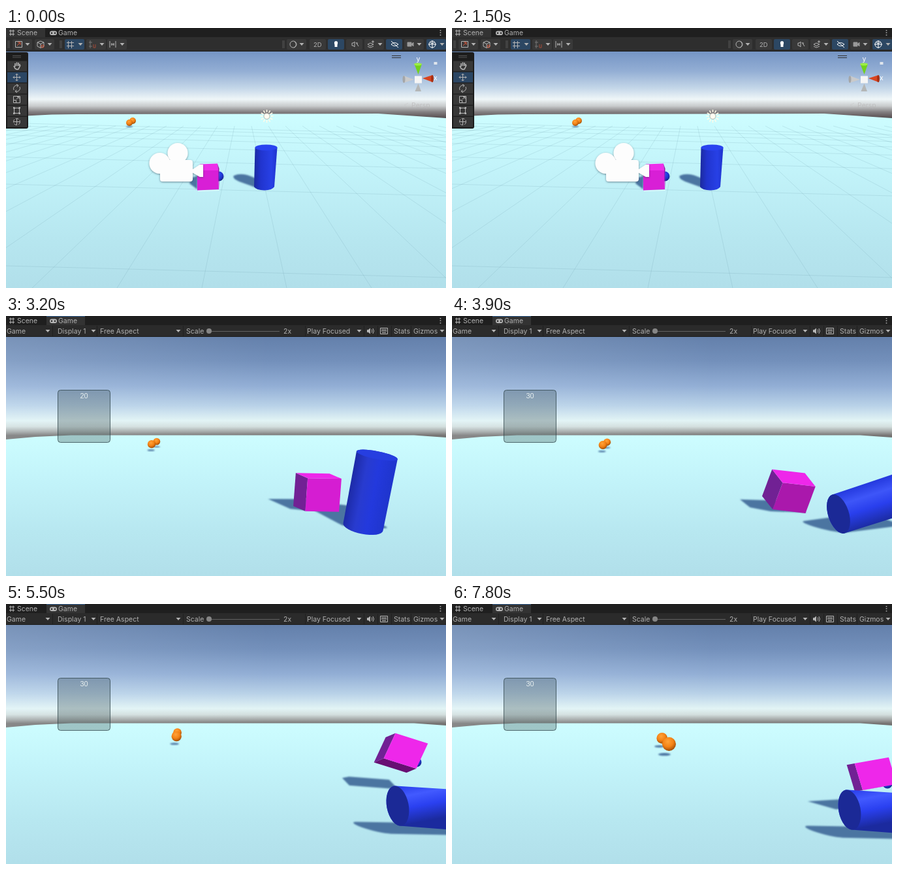
Animation, 674 px wide and 398 px high, one loop 7900 ms. Source, as an HTML page:

```html
<!DOCTYPE html>
<html lang="en">
<head>
<meta charset="utf-8">
<title>Scene and game view</title>
<style>
html, body { margin: 0; width: 100%; height: 100%; overflow: hidden; background: #1f1f1f; }
svg { display: block; width: 674px; height: 398px; }
text { font: 10.5px Inter, "Liberation Sans", sans-serif; fill: #b0b0b0; }
.line { fill: none; stroke: #b4b4b4; stroke-width: 1; }
.icon { fill: #b4b4b4; }
.shadow { fill: #4b75a1; filter: url(#soft); }
</style>
</head>
<body>
<svg viewBox="0 0 674 398">
  <defs>
    <filter id="soft" x="-20%" y="-20%" width="140%" height="140%"><feGaussianBlur stdDeviation=".8"/></filter>
    <filter id="halo" x="-20%" y="-20%" width="140%" height="140%"><feDropShadow dx="0" dy="1" stdDeviation="1.5" flood-color="#345" flood-opacity=".6"/></filter>
    <linearGradient id="sky" gradientUnits="userSpaceOnUse" x1="0" x2="0" y1="31" y2="183">
      <stop stop-color="#637faa"/><stop offset=".25" stop-color="#7390bb"/><stop offset=".5" stop-color="#92aed5"/>
      <stop offset=".7" stop-color="#b9d2e8"/><stop offset=".85" stop-color="#e2f4f5"/><stop offset=".91" stop-color="#d3dfde"/>
      <stop offset=".96" stop-color="#a4a8a7"/><stop offset="1" stop-color="#757372"/>
    </linearGradient>
    <linearGradient id="glow"><stop stop-color="#e8f6ff" stop-opacity=".16"/><stop offset=".6" stop-color="#e8f6ff" stop-opacity="0"/></linearGradient>
    <linearGradient id="sceneSky" x2="0" y2="1">
      <stop stop-color="#7494c4"/><stop offset=".3" stop-color="#93aed4"/><stop offset=".55" stop-color="#c3d6e8"/>
      <stop offset=".72" stop-color="#eff6f8"/><stop offset=".82" stop-color="#c8cbcc"/>
      <stop offset=".91" stop-color="#827e80"/><stop offset="1" stop-color="#554c4e"/>
    </linearGradient>
    <linearGradient id="ground" x2="0" y2="1">
      <stop stop-color="#cdfdff"/><stop offset=".3" stop-color="#c3f4fa"/><stop offset=".7" stop-color="#b7e7f0"/><stop offset="1" stop-color="#b1dfea"/>
    </linearGradient>
    <linearGradient id="post"><stop stop-color="#1b2a9e"/><stop offset=".3" stop-color="#2135cf"/><stop offset=".75" stop-color="#2740e6"/><stop offset="1" stop-color="#1f33cc"/></linearGradient>
    <linearGradient id="barrel" gradientUnits="userSpaceOnUse"><stop/><stop offset=".3"/><stop offset=".6"/><stop offset="1"/></linearGradient>
    <radialGradient id="orange" cx=".42" cy=".32" r=".7"><stop stop-color="#ffa33a"/><stop offset=".55" stop-color="#f48215"/><stop offset="1" stop-color="#9a4a08"/></radialGradient>
    <radialGradient id="blue" cx=".4" cy=".3" r=".75"><stop stop-color="#3554ff"/><stop offset=".6" stop-color="#2036d0"/><stop offset="1" stop-color="#16227e"/></radialGradient>
    <linearGradient id="glass" x2="0" y2="1"><stop stop-color="#3f5560" stop-opacity=".36"/><stop offset="1" stop-color="#4f6664" stop-opacity=".36"/></linearGradient>
  </defs>

  <g id="scene">
    <rect y="35" width="674" height="103" fill="url(#sceneSky)"/>
    <path d="M0 136L70 132.500 110 132 570 131 674 138V398H0Z" fill="url(#ground)"/>
    <path id="grid" fill="none" stroke="#5c8b9c" stroke-width=".7" opacity=".25"/>
    <ellipse class="shadow" cx="189" cy="151" rx="5" ry="1"/>
    <circle cx="194" cy="142" r="5" fill="url(#orange)"/><circle cx="189" cy="145" r="5" fill="url(#orange)"/>
    <g transform="translate(399.500 135)">
      <path id="rays" fill="none" stroke="#fffbe8" stroke-width="1.600"/>
      <circle r="4.500" fill="#fffdf2" stroke="#a7a397" stroke-width=".8"/>
    </g>
    <path class="shadow" d="M385 245L357 235Q346 230 349 226 360 221 375 227L400 237Z"/>
    <path d="M381.500 183L380 243Q383 248 396 248.500 408 248 411 243L415.500 183Z" fill="url(#post)"/>
    <ellipse cx="398.500" cy="183" rx="17" ry="4.500" fill="#2a44f0"/>
    <path class="shadow" d="M293 247L281 238 285 229 294 226Z"/>
    <circle cx="326" cy="227" r="7.500" fill="url(#blue)"/>
    <path d="M293 218H325L326 247 293 248.500Z" fill="#d81fd6"/>
    <path d="M293 218L297 208.500 324 207.500 325 218Z" fill="#ee2eea"/>
    <path d="M325 218L324 208 326.500 215V247Z" fill="#a014a8"/>
    <path d="M294 249.500L327 248.500" stroke="#e8ffff"/>
    <g fill="#fdfdfd" filter="url(#halo)">
      <circle cx="263" cy="191.500" r="15.500"/><circle cx="235.500" cy="207" r="16"/>
      <rect x="236" y="202" width="50" height="33" rx="4"/><path d="M285 217L297 209H302V228H297L285 221Z"/>
    </g>

    <path d="M591 42.500H605M591 45.500H605" stroke="#333"/>
    <path d="M625.500 55H637L631.500 71Z" fill="#72d21c"/><ellipse cx="631" cy="55.500" rx="6" ry="2" fill="#9cee45"/>
    <path d="M653.500 72V83L638 77Z" fill="#d94420"/><ellipse cx="653" cy="77.500" rx="2" ry="5.500" fill="#a82f12"/>
    <path d="M609 73V84L625 79Z" fill="#c9cacb"/><ellipse cx="609.500" cy="78.500" rx="2" ry="5.500" fill="#a4a6a8"/>
    <path d="M626.500 97H636L631.500 85Z" fill="#b4b6b6"/>
    <rect x="626" y="73.500" width="11" height="11" fill="#f5f5f5"/>
    <text x="628.500" y="51" style="fill:#fff">y</text><text x="655" y="80" style="fill:#fff">x</text>
    <rect x="655.500" y="52" width="5" height="4" fill="#dfe5ec"/>
    <text x="621" y="121.500" style="fill:#b5b3b3" opacity=".6">Persp</text>
    <path d="M616 115L610 118 616 121" fill="none" stroke="#c5c5c5" opacity=".5"/>

    <rect x="-3" y="37" width="37" height="117" rx="3" fill="#1d1d1d"/>
    <path d="M10 42.500H23M10 45H23" stroke="#555"/>
    <g id="tools"></g>
    <g class="line">
      <path d="M12 58L14 62Q16 64 19 63L22 57M14 59V54M16.500 58V52.500M19 58V53M21 58V55" stroke-width="1.600"/>
      <path d="M11 75.500H22M16.500 70V81M13 73.500L11 75.500 13 77.500M20 73.500L22 75.500 20 77.500M14.500 72L16.500 70 18.500 72M14.500 79L16.500 81 18.500 79"/>
      <path d="M12 95A5 5 0 0 1 18 88M21 90A5 5 0 0 1 15 97M16 86L19 88 17 90.500M17 99L14 97 16 94.500"/>
      <path d="M11.500 104.500H21.500V114.500H11.500ZM11.500 110.500H15.500V114.500M16 109L20 105.500M17 105.500H20V108.500"/>
      <path d="M12.500 122.500H20.500V130.500H12.500Z"/><path d="M12.500 122.500H20.500V130.500H12.500Z" stroke-width="3" stroke-dasharray="2 6" stroke-dashoffset="1"/>
      <circle cx="16.500" cy="143.500" r="5" stroke-dasharray="5 2"/><path d="M12 143.500H21M16.500 139V148"/>
    </g>

    <rect y="14" width="674" height="22" fill="#2e2e2e"/><path d="M0 35.500H674" stroke="#191919"/>
    <g id="buttons"></g>
    <g class="line">
      <path d="M14.500 20.500H24.500V29.500H14.500Z"/><path d="M17 27L22 22M18 22H22V26" stroke="#e15a3c"/>
      <path d="M48 22L53 20 58 22V28L53 30.500 48 28ZM48 22L53 24.500 58 22M53 24.500V30"/><circle cx="56" cy="28" r="2" stroke="#e15a3c"/>
      <path d="M93 22.500H104M93 27.500H104M95.500 20V31M100.500 20V31"/>
      <path d="M127 22H132M127 28H132M129 19V31" stroke="#777"/><path d="M134 25V30H137V25" stroke="#a34b38"/>
      <path d="M159 20V30M168 20V30M161 25H166M162 23V27M165 23V27"/>
      <circle cx="440" cy="25" r="5"/><path d="M442 21A5 5 0 0 1 441 30"/>
      <path d="M530 23H532L534 21V29L532 27H530ZM536 22L540 28M538 22V25"/>
      <path d="M554 25L558 23 563 25 558 27.500ZM554 28L558 30 563 28M560 21H564M562 19V23"/>
      <path d="M590 25Q595 20 601 25 595 30 590 25M590 20L601 30" stroke="#fff"/>
      <path d="M615 22H621V28H615ZM621 25L624 22V28Z" fill="#999" stroke="#999"/>
      <circle cx="653" cy="25" r="5" stroke="#fff"/><path d="M647 25H659M653 19V31M649 21Q653 26 657 21" stroke="#fff"/>
    </g>
    <path d="M503.500 26Q501.500 20 505.500 20T507.500 26V29H503.500Z" fill="#fff"/>
    <text x="471" y="29" font-weight="600" style="font-size:9.500px">2D</text>
    <path id="cursor" d="M345 0H350L347 2Z" fill="#fff"/>
  </g>

  <g id="game">
    <rect y="31" width="674" height="160" fill="url(#sky)"/><rect y="31" width="674" height="160" fill="url(#glow)"/>
    <path d="M0 189L45 185 100 182.500 625 182.500 674 186V398H0Z" fill="url(#ground)"/>
    <g id="smallShadows"></g><g id="oranges"></g>
    <polygon id="cubeShadow" class="shadow"/><polygon id="barrelShadow" class="shadow"/>
    <circle id="ball" r="7.500" fill="url(#blue)"/>
    <polygon id="side" fill="#712194"/><polygon id="front"/><polygon id="top" fill="#ee27ea"/>
    <polygon id="body" fill="url(#barrel)"/><ellipse id="cap"/>
    <rect x="79.500" y="113.500" width="80" height="80" rx="4" fill="url(#glass)" stroke="#2b4046" stroke-opacity=".75"/>
    <text id="score" x="119.500" y="126" text-anchor="middle" style="font:11px 'Liberation Sans',Arial,sans-serif;fill:#e6eeee"></text>
    <rect y="14" width="674" height="18" fill="#2b2b2b"/><path d="M0 31.500H674" stroke="#1b1b1b"/>
    <g id="labels"></g>
    <path d="M307 23.500H419" stroke="#626262"/><circle cx="311" cy="23" r="4" fill="#868686"/>
    <path d="M71.500 15V31M139.500 15V31M271.500 15V31M458.500 15V31M548.500 15V31M569.500 15V31M590.500 15V31M620.500 15V31" stroke="#202020"/>
    <path class="icon" d="M553 21H555L558 18.500V27.500L555 25H553Z"/><path class="line" d="M560 20.500Q562 23 560 25.500M562 19Q565 23 562 27"/>
    <path class="line" d="M573.500 18.500H584.500V27.500H573.500ZM575 21H583M575 23H583M576 25.500H582"/>
  </g>

  <rect width="674" height="14" fill="#1f1f1f"/>
  <rect id="tab" height="14" fill="#333"/><rect id="tabLine" height="1" fill="#34608f"/>
  <path class="line" d="M5 4.500H13M5 9.500H13M7 2.500V12M11 2.500V12"/>
  <rect class="icon" x="67" y="4.500" width="11" height="6.500" rx="3.200"/><circle cx="70" cy="7.700" r="1.200" fill="#222"/><circle cx="75" cy="7.700" r="1.200" fill="#222"/>
  <text x="17" y="11">Scene</text><text x="80" y="11">Game</text>
  <path d="M665.500 3V12" stroke="#b4b4b4" stroke-width="1.600" stroke-dasharray="1.600 1.900"/>
</svg>
<script>
const LOOP = 7900, STEP = 100, SWITCH = 1700;
const HITS = [2200, 2600, 3900];
const $ = id => document.getElementById(id);
const set = (el, attrs) => { for (const k in attrs) el.setAttribute(k, attrs[k]); };
const add = (parent, tag, attrs) => {
  const el = document.createElementNS('http://www.w3.org/2000/svg', tag);
  set(el, attrs);
  return parent.appendChild(el);
};
const mix = (a, b, u) => a + (b - a) * u;
const clamp = u => Math.min(1, Math.max(0, u));
const ramp = (from, to, v) => { const u = clamp((v - from) / (to - from)); return u * u * (3 - 2 * u); };
const turn = deg => [Math.cos(deg * Math.PI / 180), Math.sin(deg * Math.PI / 180)];
const rotate = ([x, y], [c, s]) => [x * c - y * s, x * s + y * c];
const mixColour = (a, b, u) => `rgb(${a.map((v, i) => Math.round(mix(v, b[i], u)))})`;

// Poses are [time, ...values], joined by a monotone cubic.
function pose(keys, t) {
  const last = keys.length - 1;
  if (t <= keys[0][0]) return keys[0].slice(1);
  if (t >= keys[last][0]) return keys[last].slice(1);
  const i = keys.findIndex(k => k[0] > t) - 1;
  const [a, b] = [keys[i], keys[i + 1]], h = b[0] - a[0], u = (t - a[0]) / h, w = 1 - u;
  const slope = (n, v) => (keys[n + 1][v] - keys[n][v]) / (keys[n + 1][0] - keys[n][0]);
  const tangent = (n, v) => {
    const p = slope(Math.max(n - 1, 0), v), q = slope(Math.min(n, last - 1), v);
    return p * q > 0 ? 2 * p * q / (p + q) : 0;
  };
  return a.slice(1).map((x, j) => {
    const v = j + 1;
    return x * (1 + 2 * u) * w * w + b[v] * u * u * (3 - 2 * u) +
      h * (tangent(i, v) * u * w * w - tangent(i + 1, v) * u * u * w);
  });
}

// Centre, yaw, pitch, roll.
const cubePoses = [
  [1700, 340, 269, 4, 9, 0],
  [3200, 477, 270, 20, 8, 4],
  [4600, 551, 264, 29, 45, 38],
  [5500, 605, 228, 41, 72, 62],
  [6800, 632, 264, 40, 25, 62],
  [7800, 643, 261, 90, 77, 77]
];
// Base centre, lean.
const barrelPoses = [
  [2700, 508, 322, 0],
  [3200, 547, 323, 11],
  [3900, 592, 303, 72],
  [4600, 616, 282, 108],
  [5500, 600, 309, 94],
  [7800, 609, 315, 94]
];
// Rear, then front: start and growth per second squared.
const spheres = [
  {x: [225, 2.6], y: [191.3, .38], r: [5.2, .085]},
  {x: [216, 3.13], y: [195, .52], r: [5.9, .125]}
].map(path => ({
  path,
  shadow: add($('smallShadows'), 'ellipse', {class: 'shadow'}),
  ball: add($('oranges'), 'circle', {fill: 'url(#orange)'})
}));

function hull(points) {
  points.sort((p, q) => p[0] - q[0] || p[1] - q[1]);
  const half = list => {
    const out = [];
    for (const p of list) {
      while (out.length > 1) {
        const [a, b] = out.slice(-2);
        if ((b[0] - a[0]) * (p[1] - a[1]) - (b[1] - a[1]) * (p[0] - a[0]) > 0) break;
        out.pop();
      }
      out.push(p);
    }
    return out.slice(0, -1);
  };
  return [...half(points), ...half(points.slice().reverse())].join(' ');
}

// Light falls from the upper right, so height moves a shadow left and down.
const shadowOf = (points, middle, height) => hull(points.map(([x, y]) => {
  const h = height + middle - y;
  return [x - .75 * h, y + .7 * h];
}));

function ellipsePoints(x, y, rx, ry, dir) {
  return Array.from({length: 32}, (_, i) => {
    const [c, s] = turn(i * 11.25), [px, py] = rotate([rx * c, ry * s], dir);
    return [x + px, y + py];
  });
}

function drawCube(t) {
  const [x, y, yaw, pitch, roll] = pose(cubePoses, t);
  const [cy, sy] = turn(yaw), [cp, sp] = turn(pitch);
  const width = 55, height = mix(52, 42, ramp(460, 560, x));
  const edge = v => { const [ex, ey] = rotate(v, turn(roll)); return [ex * width, ey * height]; };
  const right = edge([cy, -sy * sp]), down = edge([0, cp]), back = edge([-sy, -cy * sp]);
  const corner = (i, j, k) => [0, 1].map(n =>
    [x, y][n] + (i - .5) * right[n] + (j - .5) * down[n] + (k - .5) * back[n]);
  const bits = [0, 1];
  const corners = bits.flatMap(i => bits.flatMap(j => bits.map(k => corner(i, j, k))));
  const quad = [[0, 0], [1, 0], [1, 1], [0, 1]];
  const face = (id, place) => set($(id), {points: quad.map(([u, v]) => place(u, v)).join(' ')});
  face('side', (u, v) => corner(0, u, v));
  face('front', (u, v) => corner(u, v, 0));
  face('top', (u, v) => corner(u, 0, v));
  set($('front'), {fill: mixColour([226, 31, 221], [104, 15, 115], clamp(roll / 38))});
  set($('cubeShadow'), {points: shadowOf(corners, y, mix(27, 65, ramp(3400, 5600, t)))});
  set($('ball'), {cx: x + 24, cy: y + 14});
}

function drawBarrel(t) {
  const [x, y, lean] = pose(barrelPoses, t);
  const fall = ramp(2700, 4200, t), fallen = lean > 45;
  const tilt = lean - 15 * ramp(4600, 5500, t), dir = turn(tilt);
  const [c, s] = turn(lean), r = 31, length = 112;
  const open = mix(.28, .54, fall) + Math.max(0, lean - 94) * .012;
  const base = [x, y, r, r * open];
  const far = [x + length * s, y - length * c, r + 1, r * open * mix(.4, 1, fall)];
  const outline = [...ellipsePoints(...base, dir), ...ellipsePoints(...far, dir)];
  set($('body'), {points: hull(outline)});
  set($('barrelShadow'), {points: shadowOf(outline, (y + far[1]) / 2, mix(56, 44, fall))});
  set($('barrel'), {x1: x - r * dir[0], y1: y - r * dir[1], x2: x + r * dir[0], y2: y + r * dir[1]});
  const upright = [[26, 37, 145], [31, 48, 190], [32, 54, 215], [33, 57, 222]];
  const lying = [[38, 60, 232], [66, 90, 255], [42, 64, 240], [27, 42, 158]];
  [...$('barrel').children].forEach((stop, i) => set(stop, {'stop-color': mixColour(upright[i], lying[i], fall)}));
  const [cx, cy, rx, ry] = fallen ? base : far;
  set($('cap'), {cx, cy, rx, ry, transform: `rotate(${tilt} ${cx} ${cy})`, fill: fallen ? '#1b2996' : '#263ee0'});
}

function drawSpheres(t) {
  const s2 = ((t - SWITCH) / 1000) ** 2;
  for (const {path, shadow, ball} of spheres) {
    const [cx, cy, r] = [path.x, path.y, path.r].map(([from, growth]) => from + growth * s2);
    set(ball, {cx, cy, r});
    set(shadow, {cx: cx - (r - 5.5) * 1.4, cy: cy + r * 1.5, rx: r * .9, ry: r * .2});
  }
}

function render(t) {
  const playing = t >= SWITCH;
  set($('scene'), {display: playing ? 'none' : 'inline'});
  set($('game'), {display: playing ? 'inline' : 'none'});
  set($('cursor'), {display: t < STEP ? 'inline' : 'none'});
  set($('tab'), playing ? {x: 62, width: 59} : {x: 0, width: 60});
  set($('tabLine'), {x: 62, width: playing ? 59 : 0});
  if (!playing) return;
  drawSpheres(t);
  drawCube(t);
  drawBarrel(t);
  $('score').textContent = 10 * HITS.filter(hit => t >= hit).length;
}

const caret = (parent, x, y) => add(parent, 'path', {class: 'icon', d: `M${x - 3.5} ${y - 2}h7l-3.500 4z`});

function buildStatic() {
  const labels = {1: 'Game', 79: 'Display 1', 144: 'Free Aspect', 276: 'Scale', 425: '2x', 461: 'Play Focused', 594: 'Stats', 624: 'Gizmos'};
  for (const x in labels) add($('labels'), 'text', {x, y: 27}).textContent = labels[x];
  for (const x of [64, 134, 264, 541, 668]) caret($('labels'), x, 23);

  const button = (x, width, fill) => add($('buttons'), 'rect', {x, y: 17, width, height: 16, rx: 2, fill});
  for (const x of [10, 44, 123, 155, 430, 549, 610]) button(x, 30, '#393939');
  for (const x of [465, 521]) button(x, 25, '#393939');
  for (const x of [90, 644]) button(x, 30, '#2c4763');
  for (const x of [493, 582]) button(x, 25, '#2c4763');
  for (const x of [33, 67, 114, 147, 178, 453, 573, 633, 668]) caret($('buttons'), x, 25);
  for (const x of [3, 83, 424]) add($('buttons'), 'path', {d: `M${x} 19V31M${x + 2} 19V31`, stroke: '#555'});

  for (let i = 0; i < 6; i++)
    add($('tools'), 'rect', {x: 2, y: 50.5 + i * 17.1, width: 30, height: 15.8, fill: i === 1 ? '#2b4664' : '#373737'});

  let grid = '', rays = '';
  for (let i = -12; i <= 12; i++) grid += `M${350 + i * 26} 150L${300 + i * 130} 398`;
  for (let i = 1; i < 9; i++) {
    const y = 122 + 250 / i;
    grid += `M0 ${y - 8}L674 ${y + 10}`;
  }
  for (let i = 0; i < 12; i++) {
    const [c, s] = turn(i * 30);
    rays += `M${6 * c} ${6 * s}L${10 * c} ${10 * s}`;
  }
  set($('grid'), {d: grid});
  set($('rays'), {d: rays});
}

buildStatic();
render(0);
const start = performance.now();
function tick() {
  const t = (performance.now() - start) % LOOP;
  render(Math.floor(t / STEP) * STEP);
  requestAnimationFrame(tick);
}
requestAnimationFrame(tick);
</script>
</body>
</html>
```
